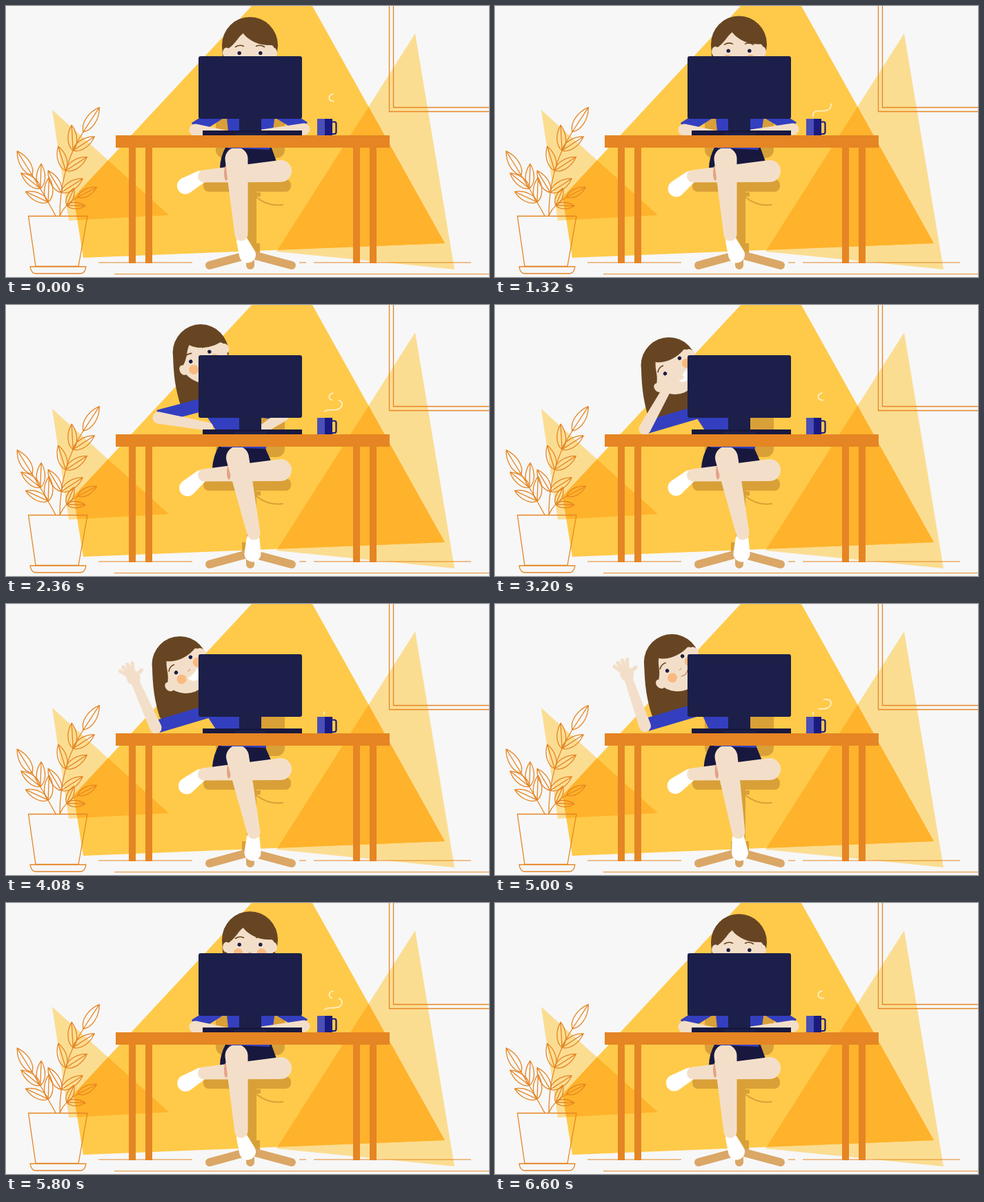
An HTML page with a canvas for the animation above (6.64 s loop, 700 px wide and 394 px high).

```html
<!DOCTYPE html>
<html lang="en">
<head>
<meta charset="utf-8">
<title>Waving from the desk</title>
<style>
html, body { margin: 0; width: 100%; height: 100%; overflow: hidden; background: #f7f7f7; }
canvas { display: block; }
</style>
</head>
<body>
<canvas id="stage" width="700" height="394"></canvas>
<script>
const c = document.getElementById('stage').getContext('2d');
const LOOP = 6640, TAU = Math.PI * 2, RAD = Math.PI / 180;
const ORANGE = '#e58523', SKIN = '#f3dfc9', HAIR = '#674523', BLUE = '#333fbf',
  NAVY = '#1c1f49', DARK = '#18183f', CHAIR = '#d9a038', WOOD = '#daa766', WHITE = '#fff';

const clamp = u => Math.min(1, Math.max(0, u));
const mix = (a, b, k) => a + (b - a) * k;
function ease(t, from, to) {
  const u = clamp((t - from) / (to - from));
  return u * u * (3 - 2 * u);
}
// Rises over a..b, falls back over d..e.
const pulse = (t, a, b, d, e) => ease(t, a, b) - ease(t, d, e);

function fill(path, color) { c.fillStyle = color; c.fill(new Path2D(path)); }
function line(path, color, width = 1.3, cap = 'round') {
  c.strokeStyle = color; c.lineWidth = width; c.lineCap = cap; c.lineJoin = 'round';
  c.stroke(new Path2D(path));
}
function rect(x, y, w, h, color, r = 0) {
  c.fillStyle = color; c.beginPath(); c.roundRect(x, y, w, h, r); c.fill();
}
function oval(x, y, rx, ry, color) {
  c.fillStyle = color; c.beginPath(); c.ellipse(x, y, rx, ry, 0, 0, TAU); c.fill();
}
// Limb: the hull of two circles.
function limb(x1, y1, r1, x2, y2, r2, color) {
  const a = Math.atan2(y2 - y1, x2 - x1);
  const p = Math.acos((r1 - r2) / Math.hypot(x2 - x1, y2 - y1));
  c.fillStyle = color; c.beginPath();
  c.arc(x1, y1, r1, a + p, a - p + TAU);
  c.arc(x2, y2, r2, a - p, a + p);
  c.fill();
}

const BIG = 'M356 0H444L636 345L112 366L98 278Z';
const SIDES = ['M67 151L236 304L91 312Z', 'M593 40L650 383L392 357Z'];

function backdrop() {
  rect(0, 0, 700, 394, '#f7f7f7');
  SIDES.forEach(p => fill(p, '#fbdd92'));
  fill(BIG, '#ffca49');
  c.save();
  c.clip(new Path2D(BIG));
  SIDES.forEach(p => fill(p, '#ffb22b'));
  c.restore();
  line('M555.5 0V153.5H700M561.5 0V147.5H700', ORANGE);
  line('M134 373H270M425 373H435M446 373H674M157 389.8H700', ORANGE, 1.1, 'butt');
}

function leaf(x, y, angle, size) {
  c.save();
  c.translate(x, y);
  c.rotate(angle);
  c.scale(size, size);
  line('M0 0C.2 .23 .65 .23 1 0C.65 -.23 .2 -.23 0 0H1', ORANGE, 1.3 / size);
  c.restore();
}

// Curved stem with leaf pairs along it and one leaf at its end.
function sprig(x0, y0, cx, cy, x1, y1, pairs, left, right, turn, size) {
  line(`M${x0} ${y0}Q${cx} ${cy} ${x1} ${y1}`, ORANGE);
  const bend = (a, b, d, u) => mix(mix(a, b, u), mix(b, d, u), u);
  for (let i = 0; i < pairs; i++) {
    const u = (i + 1) / (pairs + 1), x = bend(x0, cx, x1, u), y = bend(y0, cy, y1, u);
    leaf(x, y, (left + turn * i) * RAD, size);
    leaf(x, y, right * RAD, size);
  }
  leaf(x1, y1, Math.atan2(y1 - cy, x1 - cx), size * 1.15);
}

function plant() {
  sprig(78, 305, 78, 235, 112, 183, 3, -121, -33, 14, 37);
  sprig(72, 305, 56, 275, 38, 246, 2, -155, -88, 14, 36);
  sprig(78, 305, 85, 288, 104, 278, 1, -67, 2, 0, 27);
  line('M32.5 305.5H118L105 378.5H43ZM35 379H116C115 385 113 389 108 389H43C38 389 36 385 35 379Z', ORANGE);
}

function chair() {
  rect(304, 150, 100, 71, CHAIR, 12);
  rect(349, 268, 14, 80, CHAIR);
  rect(342, 345, 26, 14, CHAIR);
  rect(362, 271, 7, 6, CHAIR);
  line('M363 278C374 287 386 291 401 289', CHAIR, 2);
  line('M295 377L350 362M414 377L358 362M354 364V377', WOOD, 12);
  rect(286, 252, 127, 18, CHAIR, 8);
}

function legs(t, k) {
  const sx = -10 * k;
  fill(`M${319 + sx} 204H${384 + sx}L${393 + sx * 0.8} 229L${345 + sx} 240L${310 + sx * 1.1} 237Q${310 + sx} 220 ${319 + sx} 204Z`, DARK);
  fill(`M${336 + sx * 2.4} 204H${382 + sx * 0.5}V209L${336 + sx * 2.4} 207Z`, BLUE);
  const swing = (150 - 11 * (0.5 - 0.5 * Math.cos(t / LOOP * 7 * TAU))) * RAD;
  const at = r => [285 + r * Math.cos(swing), 247 + r * Math.sin(swing)];
  limb(...at(4), 9.5, ...at(29), 12, WHITE);
  limb(398, 240, 16, 287, 247.5, 9, SKIN);
  oval(319 + 4 * k, 243, 3, 11, '#e5a287');
  limb(mix(342, 358, k), 341, mix(8, 9.5, k), mix(350, 357.5, k), 361.5, 12, WHITE);
  limb(mix(334, 335.5, k), 222, 16.5, mix(341, 359, k), 332, 9.5, SKIN);
}

function torso(k) {
  fill(`M${mix(312, 280, k)} 130H${mix(394, 350, k)}L${mix(383, 368, k)} 207H${mix(322, 316, k)}` +
    `L${mix(322, 304, k)} 182L${mix(320, 291, k)} 162Z`, BLUE);
}

function head(t, p) {
  const peek = pulse(t, 1200, 1480, 5700, 6400);
  c.save();
  c.translate(mix(353.5, 252, p), 57 - 4 * peek + 35 * p ** 2.2);
  fill('M-40 0C-40 32 -36 56 -29 77Q-26 81 -18 80C0 78 18 74 28 66L40 0Z', HAIR);
  oval(0, 0, 40.5, 41, HAIR);
  c.rotate(-47 * p ** 1.5 * RAD);
  oval(0, 8, 35, 38, SKIN);
  c.save();
  c.translate(3 * p - 7 * Math.sin(Math.PI * p), 11.5 - 4.5 * peek - 3 * p);
  for (const s of [-1, 1]) {
    oval(s * 17, 12.5, 7, 7, '#f9ba80');
    oval(s * 15.3, 0, 2.7, 2.7, '#1d1b45');
    line(`M${s * 9} -10Q${s * 15} -13 ${s * 21} -9`, HAIR, 1.6);
  }
  line('M-2 11Q0 13 2 11', '#dfae8c');
  const g = pulse(t, 2600, 2900, 4500, 4850);
  line('M-6 20Q0 24 6 20', '#c9805f');
  if (g > 0) fill(`M-10 18Q0 21 10 18Q9 ${20 + 10 * g} 0 ${20 + 10 * g}Q-9 ${20 + 10 * g} -10 18Z`, WHITE);
  c.restore();
  fill('M-40 3A40.5 41 0 0 1 40 3Q36 5 32 0C16 1 0 -5 -10 -17C-18 -11 -20 -3 -30 4Q-36 8 -40 3Z', HAIR);
  line('M-10 -17Q-3 -7 9 -2', SKIN, 0.8);
  for (const s of [-1, 1]) oval(s * 34, 11, 5.5, 7.5, SKIN);
  c.restore();
}

function sleeve(x1, y1, x2, y2) {
  line(`M${x1} ${y1}L${x2} ${y2}`, BLUE, 19, 'butt');
}

function hand(open) {
  oval(0, 0, 11, 10, SKIN);
  for (let i = 0; i < 5; i++) {
    const thumb = i === 4, a = (thumb ? 72 : -40 + 20 * i) * open * RAD, r = thumb ? 16 : 21;
    line(`M${4 * Math.cos(a)} ${6 * Math.sin(a)}L${r * Math.cos(a)} ${r * Math.sin(a)}`, SKIN, 5.5);
  }
}

function arms(t, p) {
  const arc = Math.sin(Math.PI * p);
  const rx = 432 - 87 * p ** 3, ry = 179 - 26 * p;
  sleeve(mix(391, 340, p), 152, rx, ry - 2);
  limb(rx, ry, 8.5, 362, 187, 6, SKIN);

  const x = mix(274, 217, p) - 16 * arc, y = 180 - 20 * arc;
  const up = pulse(t, 2900, 3440, 5000, 5420);
  const wave = -104 - 10 * Math.cos((t - 4080) / 790 * TAU);
  sleeve(315 - 8 * p, 152 - 17 * arc, x + 3 * up, y - 2);
  c.save();
  c.translate(x, y);
  c.rotate(mix(10, wave, up) * RAD);
  limb(0, 0, 8.6, 74, 0, 6, SKIN);
  c.translate(80, 0);
  if (up > 0) hand(up);
  c.restore();
}

function furniture() {
  rect(338, 160, 32, 28, NAVY);
  rect(285, 181, 144, 7, DARK);
  rect(331, 184, 47, 4, NAVY);
  rect(279, 73, 150, 91, NAVY, 3);
  for (const x of [178, 202, 503, 527]) rect(x, 200, 10, 174, ORANGE);
  rect(159, 188, 397, 18, ORANGE);
  line('M472 168.5H476Q478.5 168.5 478.5 171V183Q478.5 186 476 186H472', '#1a1a80', 2.2);
  rect(451, 164, 22, 24, '#1a1a80');
  rect(451, 164, 11, 24, '#4a50b8');
}

const STEAM = 'M461 161C460 154 464 152.5 470 152.5C482 153 487 150 487 144C487 138 480 138.5 474 138.5C467 138 466 129.5 474 128';
const ruler = document.createElementNS('http://www.w3.org/2000/svg', 'path');
ruler.setAttribute('d', STEAM);
const steamLength = ruler.getTotalLength();

function wisp(age) {
  const front = clamp(age / 1400), tail = 1 - (1 - clamp((age - 800) / 1900)) ** 2;
  if (front <= tail) return;
  c.setLineDash([(front - tail) * steamLength, 999]);
  c.lineDashOffset = -tail * steamLength;
  line(STEAM, '#fff3d6', 1.6);
  c.setLineDash([]);
}

function draw(now) {
  const t = now % LOOP;
  const lean = pulse(t, 1900, 2620, 4920, 5560);
  const hips = pulse(t, 1760, 2300, 4720, 5440);
  backdrop();
  plant();
  chair();
  legs(t, hips);
  torso(hips);
  head(t, lean);
  arms(t, lean);
  furniture();
  // Two puffs, 920 ms apart, rise twice per loop.
  for (const start of [560, 4000])
    for (const gap of [0, 920]) wisp((t - start - gap + LOOP) % LOOP);
}

let begin;
function tick(now) {
  begin ??= now;
  draw(now - begin);
  requestAnimationFrame(tick);
}
draw(0);
requestAnimationFrame(tick);
</script>
</body>
</html>
```
